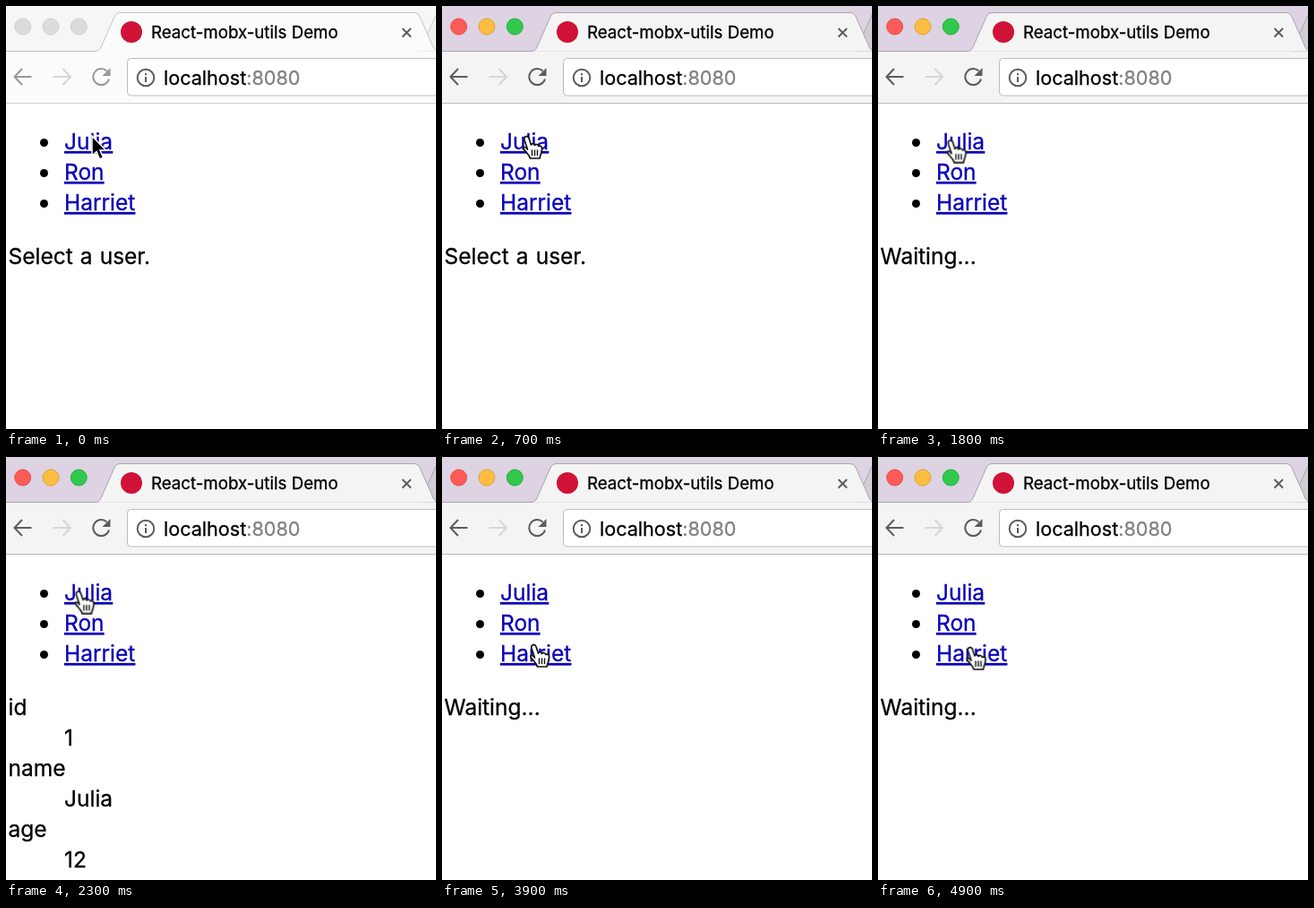
Recreate the animation shown at these times as an HTML page. Size 480 by 472 pixels, loop 5000 ms.

```html
<!DOCTYPE html>
<html lang="en">
<head>
<meta charset="utf-8">
<title>User list demo</title>
<style>
html, body { margin: 0; width: 100%; height: 100%; overflow: hidden; background: #fff; }
svg { display: block; width: 480px; height: 472px; }
text { font: 24.5px Inter, "Open Sans", sans-serif; word-spacing: 1.2px; fill: #000; stroke: #000; stroke-width: .3; }
.title { font-size: 18.7px; word-spacing: 0; }
.url { font-size: 21.6px; }
.port { fill: #808080; stroke: #808080; }
.link { fill: #0a00b8; stroke: #0a00b8; text-decoration: underline 1.5px; text-underline-offset: 2px; }
.line { fill: none; stroke: #5c5c5c; stroke-width: 2; }

/* Every change is a hard step; 2% is 100 ms. */
.idle, .arrow, .hand, .ring, .select, .wait, .first, .second {
  animation: 5s step-end infinite;
}
.idle { animation-name: idle; }
.arrow { animation-name: arrow; }
.hand { animation-name: hand, move; }
.ring { animation-name: ring, ring-at; fill: none; stroke: #111; stroke-width: 2.2; }
.select { animation-name: select; }
.wait { animation-name: wait; }
.first { animation-name: first; }
.second { animation-name: second; }

@keyframes idle { 0% { visibility: visible } 2%, 100% { visibility: hidden } }
@keyframes arrow { 0% { visibility: visible } 14%, 100% { visibility: hidden } }
@keyframes hand { 0% { visibility: hidden } 14%, 100% { visibility: visible } }
@keyframes move {
  0% { transform: translate(90px, 145px) }
  16% { transform: translate(85px, 147px) }
  18% { transform: translate(79px, 149px) }
  20% { transform: translate(76.5px, 149.5px) }
  54% { transform: translate(78px, 155px) }
  56% { transform: translate(80px, 164px) }
  58% { transform: translate(82px, 172px) }
  60% { transform: translate(83px, 175.5px) }
  70% { transform: translate(85px, 181px) }
  72% { transform: translate(90px, 193px) }
  74% { transform: translate(95px, 203px) }
  76% { transform: translate(98px, 209px) }
  82%, 100% { transform: translate(98.5px, 212px) }
}
@keyframes ring {
  0%, 26%, 66%, 98%, 100% { visibility: hidden }
  24%, 64%, 96% { visibility: visible }
}
@keyframes ring-at {
  0% { transform: translate(82.5px, 149px) }
  50% { transform: translate(89px, 175px) }
  90%, 100% { transform: translate(104.5px, 212px) scale(.8) }
}
@keyframes select { 0% { visibility: visible } 26%, 100% { visibility: hidden } }
@keyframes wait {
  0%, 46%, 86% { visibility: hidden }
  26%, 66%, 98%, 100% { visibility: visible }
}
@keyframes first { 0%, 66%, 100% { visibility: hidden } 46% { visibility: visible } }
@keyframes second { 0%, 98%, 100% { visibility: hidden } 86% { visibility: visible } }
</style>
</head>
<body>
<svg viewBox="0 0 480 472">
  <defs>
    <path id="tab" d="M-2 50.5H99Q104 50.5 106 46L121 12Q123 7.5 128 7.5H455Q460 7.5 462 12L477 46Q479 50.5 484 50.5"/>
    <path id="next" d="M462 50L480 10H484V50Z"/>
    <g id="nav" fill="none" stroke="currentColor" stroke-width="2">
      <path d="M18 70L9.5 79L18 88M9.5 79H28.5"/>
      <path d="M112.5 72.5A9 9 0 1 0 115 81.5"/>
      <path d="M116.5 69V78H107.5Z" fill="currentColor" stroke="none"/>
    </g>
  </defs>

  <!-- Active window -->
  <rect width="480" height="52" fill="#ddd3e2"/>
  <use href="#next" fill="#d2cdd4" stroke="#aaa4ad"/>
  <rect y="51" width="480" height="57" fill="#f4f4f4"/>
  <use href="#tab" fill="#f4f4f4" stroke="#aaa4ad"/>
  <circle cx="18.7" cy="23" r="9" fill="#fc5b57" stroke="#e2504c"/>
  <circle cx="50" cy="23" r="9" fill="#fdbd41" stroke="#e0a236"/>
  <circle cx="81.3" cy="23" r="9" fill="#30c94d" stroke="#27ae3d"/>
  <path d="M0 108.5H480" stroke="#b9b9b9"/>
  <use href="#nav" color="#5c5c5c"/>

  <!-- Inactive window -->
  <g class="idle">
    <rect width="480" height="52" fill="#f6f6f6"/>
    <use href="#next" fill="#f0f0f0" stroke="#c8c8c8"/>
    <rect y="51" width="480" height="57" fill="#fbfbfb"/>
    <use href="#tab" fill="#fbfbfb" stroke="#c4c4c4"/>
    <g fill="#dcdcdc" stroke="#cfcfcf">
      <circle cx="18.7" cy="23" r="9"/><circle cx="50" cy="23" r="9"/><circle cx="81.3" cy="23" r="9"/>
    </g>
    <path d="M0 108.5H480" stroke="#d0d0d0"/>
    <use href="#nav" color="#999"/>
  </g>

  <circle cx="140" cy="29" r="12" fill="#cf1236"/>
  <text class="title" x="162" y="36">React-mobx-utils Demo</text>
  <path class="line" d="M442.5 25L452 34.5M452 25L442.5 34.5"/>
  <path class="line" style="stroke:#d6d6d6" d="M63.5 70L72 79L63.5 88M72 79H52.5"/>
  <rect x="135.5" y="58.5" width="360" height="41.5" rx="4" fill="#fff" stroke="#bdbdbd"/>
  <circle class="line" cx="156" cy="80" r="9.3"/>
  <path class="line" d="M156 79V85M156 75V77.2"/>
  <text class="url" x="176" y="87.5">localhost<tspan class="port">:8080</tspan></text>

  <!-- Page -->
  <circle cx="42.5" cy="152.5" r="4.5"/>
  <circle cx="42.5" cy="186.5" r="4.5"/>
  <circle cx="42.5" cy="220.5" r="4.5"/>
  <text class="link" x="65" y="160">Julia</text>
  <text class="link" x="65" y="194">Ron</text>
  <text class="link" x="65" y="228">Harriet</text>

  <text class="select" x="2.5" y="288">Select a user.</text>
  <text class="wait" x="2.5" y="288">Waiting...</text>
  <g class="first">
    <text x="2.5" y="288">id</text><text x="65" y="322">1</text>
    <text x="2.5" y="356">name</text><text x="65" y="390">Julia</text>
    <text x="2.5" y="424">age</text><text x="65" y="458">12</text>
  </g>
  <g class="second">
    <text x="2.5" y="288">id</text><text x="65" y="322">2</text>
    <text x="2.5" y="356">name</text><text x="65" y="390">Ron</text>
    <text x="2.5" y="424">age</text><text x="65" y="458">13</text>
  </g>

  <!-- Pointer -->
  <circle class="ring" r="47.5"/>
  <path class="arrow" d="M96 145V167L101 162.5L104.5 171L108.5 169.3L105 161H111.5Z" fill="#000" stroke="#fff" stroke-width="1.5"/>
  <g class="hand" stroke="#111" stroke-linecap="round" stroke-linejoin="round">
    <path fill="#fff" stroke-width="1.7" d="M5.5 15L2 4.5C.8 .3 5.5 -1 7 2.5L9.5 10C10 8 13 8 13.5 10.5C14.5 8.8 17.5 9.2 17.8 11.5C19 10.5 21.5 11.3 21.5 13.5C21.8 18 20 20 19 25H8.5C7.5 21 4 18.5 1.5 15C-.5 12.5 2.5 11 5.5 15Z"/>
    <path fill="none" stroke-width="1.4" d="M10.5 16V21.5M13.5 16V21.5M16.5 16V21.5"/>
  </g>
</svg>
</body>
</html>
```
